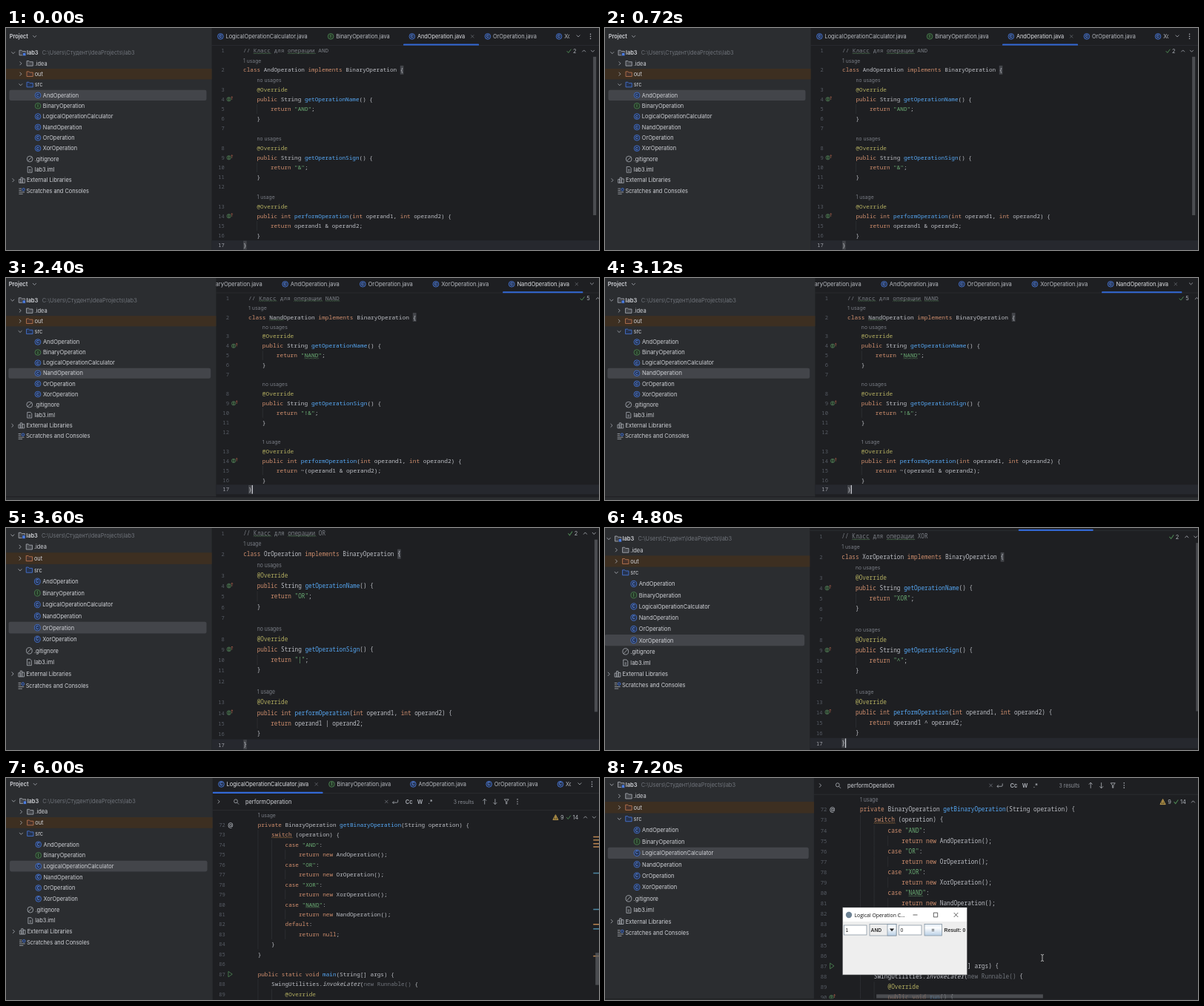
An HTML page that plays this animation: 800 by 300 pixels, repeating every 8000 ms.

```html
<!DOCTYPE html>
<html lang="en">
<head>
<meta charset="utf-8">
<title>Logic operations project</title>
<style>
html, body { margin: 0; width: 100%; height: 100%; overflow: hidden; background: #1e1f22; }
svg { display: block; width: 100vw; height: 100vh; }
text { font: 12.5px Inter, sans-serif; white-space: pre; }
.mono { font: 13px "Noto Sans Mono", monospace; }
.num { font: 12px "Noto Sans Mono", monospace; }
.hint { font-size: 11.5px; }
.bold { font-weight: 600; }
.badge { font-size: 9px; font-weight: 600; text-anchor: middle; }
.title { font: 6.9px "Open Sans", sans-serif; }
.swing { font: bold 6.8px "Liberation Sans", sans-serif; }
.plain { font-weight: 400; }
.scene { visibility: hidden; animation: show 8s step-end infinite; }
.scene:last-child { animation-name: last; }
@keyframes show { 0% { visibility: visible; } 15%, 100% { visibility: hidden; } }
@keyframes last { 0% { visibility: visible; } 10%, 100% { visibility: hidden; } }
</style>
</head>
<body>
<svg id="stage" viewBox="0 0 800 300" preserveAspectRatio="none">
  <defs>
    <clipPath id="tabClip"><rect x="470" y="0" width="818" height="42"/></clipPath>
    <linearGradient id="metal" x1="0" y1="0" x2="0" y2="1">
      <stop offset="0" stop-color="#dde8f3"/><stop offset=".3" stop-color="#fff"/>
      <stop offset="1" stop-color="#b8cfe5"/>
    </linearGradient>
  </defs>
</svg>
<script>
const NS = 'http://www.w3.org/2000/svg';
const stage = document.getElementById('stage');
const CW = 7.8, ROW = 22, TREE_ROW = 24, CODE_X = 542, EDGE = 470;
const C = { panel: '#2b2d30', editor: '#1e1f22', sel: '#43454a', text: '#d0d2d7', grey: '#6f737a',
  icon: '#aeb2b9', blue: '#4a7be0', green: '#4f8a55', orange: '#c77d55', gold: '#d6ae58',
  line: '#303236', stripe: '#b98450' };

function el(parent, tag, attrs, str) {
  const e = document.createElementNS(NS, tag);
  for (const k in attrs) e.setAttribute(k, attrs[k]);
  if (str !== undefined) e.textContent = str;
  return parent.appendChild(e);
}
const rect = (p, x, y, width, height, fill, more) => el(p, 'rect', { x, y, width, height, fill, ...more });
const text = (p, x, y, str, fill = C.text, cls = '') => el(p, 'text', { x, y: y + 4.5, fill, class: cls }, str);
const icon = (p, x, y, d, stroke = C.icon, fill = 'none', w = 1.3) =>
  el(p, 'path', { d, stroke, fill, 'stroke-width': w, transform: `translate(${x} ${y})` });

const RING = 'M-6.5 0a6.5 6.5 0 1 0 13 0a6.5 6.5 0 1 0-13 0z';
const FOLDER = 'M-7-5.5h5l2 2h7v9h-14z';
const DOWN = 'M-4-2l4 4 4-4', RIGHT = 'M-2-4l4 4-4 4', UP = 'M-4 2l4-4 4 4';
const CROSS = 'M-3.5-3.5l7 7m0-7l-7 7', CHECK = 'M-5 0l3.5 4 6-8';
const ARROW_UP = 'M0 6v-12m-4 4l4-4 4 4', ARROW_DOWN = 'M0-6v12m-4-4l4 4 4-4';

function badge(p, x, y, letter) {
  const iface = letter === 'I';
  icon(p, x, y, RING, iface ? C.green : C.blue, iface ? '#253627' : '#25324d');
  el(p, 'text', { x, y: y + 3.3, fill: iface ? '#5f9f65' : '#5f8ff0', class: 'badge' }, letter);
}

function dots(p, x, y) {
  for (let i = -1; i < 2; i++) el(p, 'circle', { cx: x, cy: y + i * 5, r: 1.3, fill: C.icon });
}

// Project tree
const CLASSES = ['And', 'Binary', 'Logical', 'Nand', 'Or', 'Xor'];
const className = c => c === 'Logical' ? 'LogicalOperationCalculator' : c + 'Operation';

function tree(p, active) {
  rect(p, -20, -20, EDGE + 20, 560, C.panel);
  text(p, 7.5, 20, 'Project', C.text, 'bold');
  icon(p, 65, 20, DOWN);
  const y = i => 57 + i * TREE_ROW;
  rect(p, -20, y(2) - 12, EDGE + 20, TREE_ROW, '#3d2f21');
  rect(p, 7, y(4 + CLASSES.indexOf(active)) - 12, 451, TREE_ROW, C.sel, { rx: 4 });

  icon(p, 16, y(0), DOWN);
  icon(p, 37, y(0), FOLDER, C.icon, C.sel);
  rect(p, 38, y(0), 7, 7, C.blue, { stroke: C.panel });
  text(p, 47, y(0), 'lab3', C.text, 'bold');
  text(p, 82, y(0), 'C:\\Users\\Студент\\IdeaProjects\\lab3', C.grey);

  [['.idea', RIGHT, C.icon, C.sel], ['out', RIGHT, C.orange, '#45322b'], ['src', DOWN, C.blue, '#25324d']]
    .forEach(([name, arrow, stroke, fill], i) => {
      icon(p, 33, y(i + 1), arrow);
      icon(p, 54, y(i + 1), FOLDER, stroke, fill);
      text(p, 65, y(i + 1), name);
    });
  CLASSES.forEach((c, i) => {
    badge(p, 72.5, y(i + 4), c === 'Binary' ? 'I' : 'C');
    text(p, 84, y(i + 4), className(c));
  });
  icon(p, 54, y(10), RING + 'M-4.5 4.5l9-9');
  text(p, 65, y(10), '.gitignore');
  icon(p, 54, y(11), 'M-5-6.5h7l3 3v10h-10zM-2 0h4m-4 3h4');
  text(p, 65, y(11), 'lab3.iml');
  icon(p, 16, y(12), RIGHT);
  icon(p, 36, y(12), 'M-6.5-2h4v8h-4zM-2.5-6h4v12h-4zM1.5-3h5v9h-5z');
  text(p, 47, y(12), 'External Libraries');
  icon(p, 36, y(13), 'M-7-5h6m-6 4h6m-6 4h13m-13 4h9');
  icon(p, 39.5, y(13) - 3, 'M-3 0a3 3 0 1 0 6 0a3 3 0 1 0-6 0', C.blue, '#25324d');
  text(p, 46, y(13), 'Scratches and Consoles');
}

// Editor tabs
const TABS = [['Logical', 252], ['Binary', 186], ['And', 173], ['Or', 163], ['Xor', 169], ['Nand', 180]];

function tabs(p, active, shift) {
  rect(p, EDGE, 39.5, 900, 1, C.line);
  const row = el(p, 'g', { 'clip-path': 'url(#tabClip)' });
  let x = 502 + shift;
  for (const [c, w] of TABS) {
    const on = c === active;
    badge(row, x - 12, 20, c === 'Binary' ? 'I' : 'C');
    text(row, x, 20, className(c) + '.java', on ? '#dfe1e5' : '#b9bcc2');
    if (on) {
      icon(row, x + w - 47, 20, CROSS, C.grey, 'none', 1.1);
      rect(row, x - 32, 37, w, 3.5, '#3369d6', { rx: 1.5 });
    }
    x += w;
  }
  icon(p, 1308, 19, DOWN);
  dots(p, 1336, 20);
}

// Source code
const opFile = (cls, sign, expr) => [
  `// Класс для операции ${cls.toUpperCase()}`, '#1 usage',
  `class ${cls}Operation implements BinaryOperation {`, '#    no usages',
  '    @Override', '    public String getOperationName() {',
  `        return "${cls.toUpperCase()}";`, '    }', '', '#    no usages',
  '    @Override', '    public String getOperationSign() {',
  `        return "${sign}";`, '    }', '', '#    1 usage',
  '    @Override', '    public int performOperation(int operand1, int operand2) {',
  `        return ${expr};`, '    }', '}'];

const binaryFile = [
  '#6 usages    4 implementations', 'interface BinaryOperation {',
  '#    no usages    4 implementations', '    String getOperationName();',
  '#    no usages    4 implementations', '    String getOperationSign();',
  '#    1 usage    4 implementations', '    int performOperation(int operand1, int operand2);', '}', ''];

const calcFile = [
  '#    1 usage', '    private BinaryOperation getBinaryOperation(String operation) {',
  '        switch (operation) {',
  ...['And', 'Or', 'Xor', 'Nand'].flatMap(c => [
    `            case "${c.toUpperCase()}":`, `                return new ${c}Operation();`]),
  '            default:', '                return null;', '        }', '    }', '',
  '    public static void main(String[] args) {',
  '        SwingUtilities.invokeLater(new Runnable() {',
  '            @Override', '            public void run() {'];

const TOKEN = new RegExp([
  '(?<comment>//.*)', '(?<string>"[^"]*")', '(?<note>@\\w+)',
  '(?<dim>new Runnable\\(\\)|getOperation\\w+(?=\\(\\);))',
  '(?<key>\\b(?:class|interface|implements|public|private|static|void|int|return|new|switch|case|default|null)\\b)',
  '(?<name>\\b(?:getOperation\\w+|performOperation|getBinaryOperation|main|run)(?=\\())',
  '(?<call>invokeLater)', '(?<rest>\\w+|\\W)'].join('|'), 'g');
const INK = { comment: '#7a7e85', string: '#6aab73', note: '#b3ae60', dim: C.grey, key: '#cf8e6d',
  name: '#56a8f5', call: '#bcbec4', rest: '#bcbec4' };
const TYPO = /Класс|операции|NAND|(?<=class )Nand/g;

const colX = col => CODE_X + col * CW;

function wave(p, col, len, y, stroke) {
  icon(p, colX(col), y + 7.5, 'M0 0' + 'l2-2 2 2'.repeat(Math.round(len * CW / 4)), stroke, 'none', 1);
}

function gutterMark(p, line, y) {
  const x = 510;
  if (/static/.test(line)) icon(p, x, y, 'M-4-6l9 6-9 6z', C.green);
  else if (/private/.test(line)) text(p, x - 5, y, '@', C.icon, 'bold');
  else {
    const up = /^ +public/.test(line);
    if (!up && !/^interface|^ +(String|int) /.test(line)) return;
    icon(p, x - 1, y, 'M-4.5 0a4.5 4.5 0 1 0 9 0a4.5 4.5 0 1 0-9 0M0-2.5v5m-1.5-5h3m-3 5h3',
      '#5c8a63', '#253627', 1);
    icon(p, x + 6, y, up ? 'M0 1v-7m-2 2l2-2 2 2' : 'M0-1v7m-2-2l2 2 2-2', up ? '#b8664f' : C.icon, 'none', 1);
  }
}

function code(p, lines, { top = 52, first = 1, current, braces, word }) {
  let n = first;
  lines.forEach((line, i) => {
    const y = top + i * ROW;
    const body = line.replace(/^#/, '');
    const str = body.trim(), indent = body.length - body.trimStart().length;
    if (line[0] === '#') {
      text(p, colX(indent), y + .5, str, '#787c84', 'hint');
      return;
    }
    if (n === current) rect(p, EDGE, y - 11, 900, ROW, '#26282e');
    el(p, 'text', { x: 499, y: y + 4.5, class: 'num', 'text-anchor': 'end',
      fill: n === current ? '#a1a3ab' : '#565b64' }, n);
    gutterMark(p, line, y);
    for (let c = 4; c < indent; c += 4) rect(p, colX(c), y - 11, 1, ROW, '#34373b');
    if (braces && /^class|^}/.test(line)) rect(p, colX(line.length - 1), y - 10, CW, 20, C.sel);
    if (word && n === current) rect(p, colX(line.indexOf(word)), y - 10, word.length * CW, 20, '#373b39');
    const t = text(p, colX(indent), y, undefined, INK.rest, 'mono');
    for (const m of str.matchAll(TOKEN)) {
      const kind = Object.keys(INK).find(k => m.groups[k] !== undefined);
      const span = el(t, 'tspan', { fill: INK[kind] }, m[0]);
      if (kind === 'call') span.setAttribute('font-style', 'italic');
    }
    for (const m of line.matchAll(TYPO)) wave(p, m.index, m[0].length, y, '#5a8a5e');
    if (/switch/.test(line)) wave(p, indent, 6, y, '#b07a45');
    n++;
  });
}

const caret = (p, col, row) => rect(p, colX(col), 52 + row * ROW - 10, 2, 20, '#ced0d6');
const stripes = (p, ys, fill) => ys.forEach(y => rect(p, 1339, y, 14, 2.5, fill));
const thumb = (p, x, y, w, h) => rect(p, x, y, w, h, '#5a5c60', { opacity: .75 });

function warning(p, x, y, count) {
  icon(p, x, y, 'M0-5.5l6 11h-12z', C.gold, '#6b5a2c');
  rect(p, x - .7, y - 2, 1.4, 5, C.gold);
  text(p, x + 11, y, count, C.icon);
}

function checks(p, x, y, count) {
  icon(p, x, y, CHECK, C.green, 'none', 1.6);
  text(p, x + 9, y, count, C.icon);
}

function arrows(p, y) {
  icon(p, 1321, y, UP);
  icon(p, 1341, y, DOWN);
}

function findBar(p) {
  const y = 58.5;
  rect(p, EDGE, 77, 900, 1, C.line);
  icon(p, 484, y, RIGHT);
  icon(p, 525, y, 'M-6-1a4 4 0 1 0 8 0a4 4 0 1 0-8 0M1 2l4 4');
  text(p, 545, y, 'performOperation');
  icon(p, 867, y, CROSS, C.grey);
  icon(p, 887, y, 'M6-4v4q0 2-2 2h-10m3-3l-3 3 3 3');
  text(p, 910, y, 'Cc', C.icon, 'bold');
  text(p, 937, y, 'W', C.icon, 'bold');
  text(p, 962, y, '.*', C.icon, 'bold');
  text(p, 1020, y, '3 results', '#8b8f97', 'hint');
  icon(p, 1091, y, ARROW_UP);
  icon(p, 1115, y, ARROW_DOWN);
  icon(p, 1141, y, 'M-5-5h10l-4 5v5h-2v-5z');
  dots(p, 1166, y);
}

function calculator(p) {
  findBar(p);
  code(p, calcFile, { top: 87.2, first: 72 });
  warning(p, 1253, 93, '9');
  checks(p, 1283, 93, '14');
  arrows(p, 93);
  stripes(p, [135, 142, 150, 157, 328, 398], C.stripe);
  stripes(p, [215, 295, 338], '#4c87a3');
  thumb(p, 1344, 392, 8, 71);
  thumb(p, 610, 499, 374, 8);
}

function binary(p) {
  rect(p, 538, 41, 1, 467, '#313438');
  code(p, binaryFile, { current: 1, word: 'BinaryOperation' });
  caret(p, 10, 1);
  icon(p, 554, 96, 'M-2.5 4v-2a4.8 4.8 0 1 1 5 0v2zM-2 6.5h4', '#c8b7a0', '#c8b7a0');
  warning(p, 1293, 53, '2');
  arrows(p, 53);
  stripes(p, [131, 176], C.stripe);
}

function operation(p, lines) {
  code(p, lines, { current: 17, braces: true });
  const nand = /NAND/.test(lines[0]);
  checks(p, 1287, 53, nand ? '5' : '2');
  arrows(p, 53);
  thumb(p, 1342, 66, 7, 358);
}

function dialog(p) {
  rect(p, 320.5, 175, 168, 91, '#eee', { stroke: '#55575b', 'stroke-width': .6 });
  rect(p, 321, 175.3, 167, 18.7, '#fff');
  el(p, 'circle', { cx: 329, cy: 185, r: 4.2, fill: '#6d8294' });
  text(p, 336.5, 183, 'Logical Operation C...', '#111', 'title');
  icon(p, 418.5, 185, 'M-3 0h6', '#222', 'none', .7);
  icon(p, 446, 185, 'M-2.7-2.9h5.4v5.8h-5.4z', '#222', 'none', .7);
  icon(p, 473.5, 185, 'M-2.8-3l5.6 6m0-6l-5.6 6', '#222', 'none', .7);
  const edge = { stroke: '#7a8a99', 'stroke-width': .7 };
  rect(p, 322.5, 199, 30.5, 13, '#fff', edge);
  rect(p, 357, 197.5, 36, 15.5, '#eee', edge);
  rect(p, 381, 197.5, 12, 15.5, 'url(#metal)', edge);
  icon(p, 387, 205.3, 'M-3.2-1.7h6.4l-3.2 3.6z', 'none', '#222');
  rect(p, 396.5, 199, 30.5, 13, '#fff', edge);
  rect(p, 431, 197.5, 23.5, 15.5, 'url(#metal)', edge);
  text(p, 324.5, 203.7, '1', '#222', 'swing plain');
  text(p, 358.5, 203.7, 'AND', '#333', 'swing');
  text(p, 398.5, 203.7, '0', '#222', 'swing plain');
  text(p, 440.5, 203.5, '=', '#333', 'swing');
  text(p, 457.5, 203.7, 'Result: 0', '#333', 'swing');
  icon(p, 590, 243, 'M-2-4.5q2 0 2 1.2v6.6q0 1.2-2 1.2m4-9q-2 0-2 1.2m0 6.6q0 1.2 2 1.2', '#d8d8d8', 'none', .8);
}

// Each scene: active class, view [x, y, scaleX, scaleY], tab scroll, content, overlay
const SCENES = [
  ['And', [.3, -.6, .59, .598], 0, p => operation(p, opFile('And', '&', 'operand1 & operand2'))],
  ['Binary', [.2, -.9, .59, .587], 2, binary],
  ['Nand', [-.9, -3.5, .605, .588], -304, p => {
    operation(p, opFile('Nand', '!&', '~(operand1 & operand2)'));
    caret(p, 1, 20);
  }],
  ['Or', [-.6, -27.2, .592, .65], -304, p => operation(p, opFile('Or', '|', 'operand1 | operand2'))],
  ['Xor', [-4.5, -21.7, .5975, .635], -303, p => {
    operation(p, opFile('Xor', '^', 'operand1 ^ operand2'));
    caret(p, 1, 20);
  }],
  ['Logical', [.9, -3.9, .591, .6125], 0, calculator],
  ['Logical', [-.5, -27.5, .601, .641], 0, calculator, dialog]
];

SCENES.forEach(([active, [x, y, sx, sy], shift, content, overlay], i) => {
  const scene = el(stage, 'g', { class: 'scene', style: `animation-delay:${i * 1.2}s` });
  rect(scene, 0, 0, 800, 300, C.editor);
  const view = el(scene, 'g', { transform: `translate(${x} ${y}) scale(${sx} ${sy})` });
  tree(view, active);
  tabs(view, active, shift);
  content(view);
  rect(view, -20, 508, 1400, 2, C.editor);
  rect(view, -20, 510, 1400, 30, C.panel);
  if (overlay) overlay(scene);
});
</script>
</body>
</html>
```
